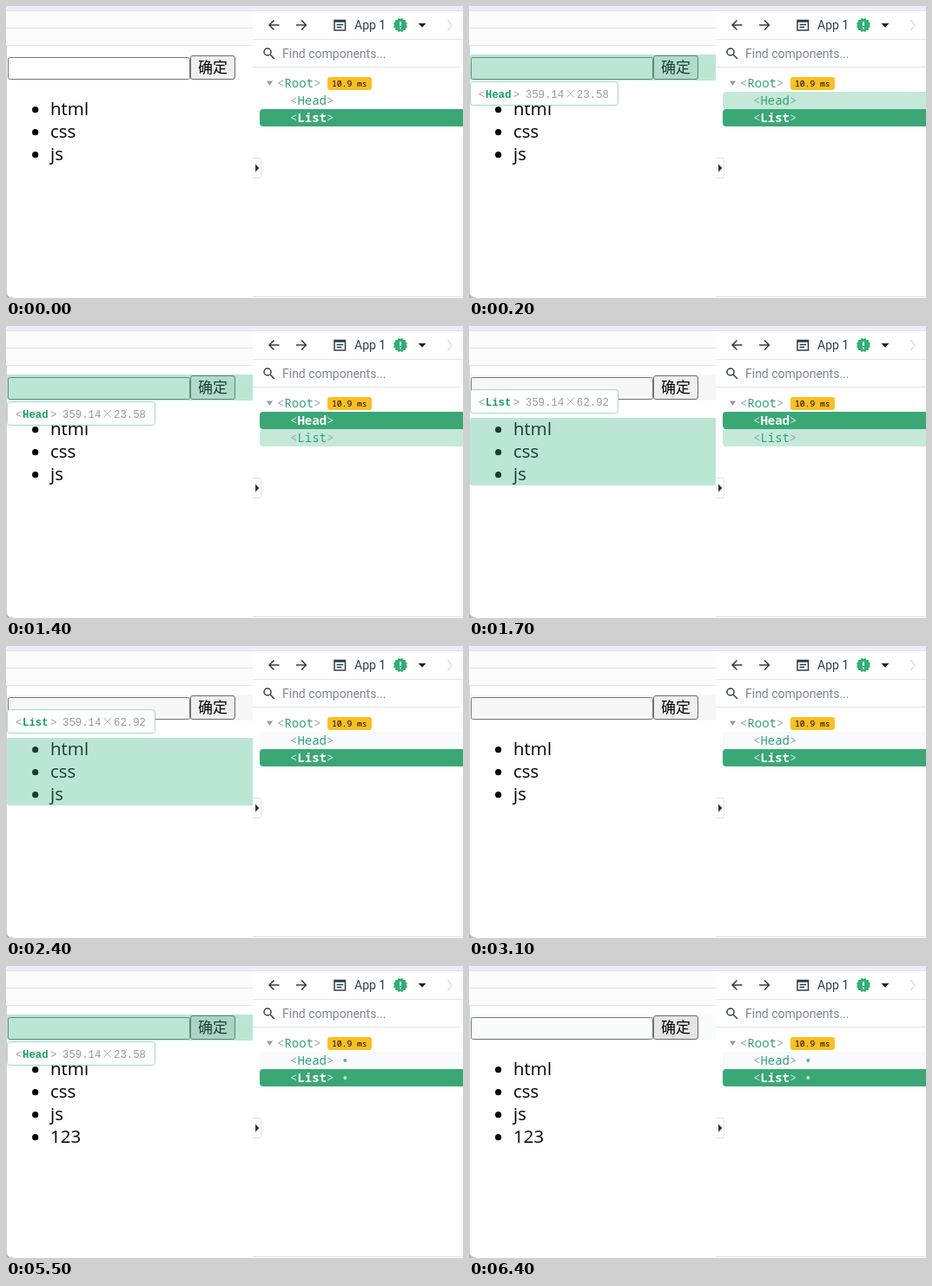
Recreate the animation shown at these times as an HTML page. Size 526 by 337 pixels, loop 6800 ms.

```html
<!DOCTYPE html>
<html lang="en">
<head>
<meta charset="utf-8">
<title>Component inspector</title>
<style>
html, body { margin: 0; width: 100%; height: 100%; overflow: hidden; background: #fff; }
svg { display: block; }
text { white-space: pre; }
.ui { font: 14px Roboto, sans-serif; }
.item { font: 20.5px "Open Sans", "Noto Sans", sans-serif; }
.field { font: 16px "Liberation Sans", sans-serif; }
.cjk { font: 17px "Noto Sans CJK SC", "Noto Sans CJK", sans-serif; }
.tag { font: 14px "Roboto Mono", "Noto Sans Mono", monospace; fill: #9aa3ad; }
.tag tspan { fill: #30a571; }
.sel { fill: #c9e9da; }
.sel tspan { fill: #fff; font-weight: 600; }
.tip { font: 12.3px "Liberation Mono", monospace; fill: #999; }
.tip .name { fill: #12a05c; font-weight: bold; }
.line { fill: none; stroke: #e1e3e8; }
.icon { fill: none; stroke: #2c3e50; stroke-width: 1.5; }
</style>
</head>
<body>
<svg width="526" height="337" viewBox="0 0 526 337">
  <!-- page -->
  <rect width="526" height="5.5" fill="#ededf5"/>
  <rect y="6" width="284" height="39" fill="#fcfcfd"/>
  <path class="line" d="M0 5.5H526M0 25.5H284M0 45.5H284"/>
  <path d="M.5 46V329Q.5 336.5 8 336.5" fill="none" stroke="#cfcfd2"/>
  <path d="M0 330Q1 336 7 337H0Z" fill="#b5b5b8"/>
  <rect id="band" x="1" y="56" width="283" height="30"/>
  <rect id="input" x="2.5" y="59.5" width="209" height="25" rx="2"/>
  <text id="typed" class="field" x="6.5" y="77"></text>
  <rect id="caret" y="62" width="1.5" height="19"/>
  <rect id="button" x="212.5" y="57.5" width="51" height="27" rx="2.5" stroke="#6b6b6b"/>
  <text class="cjk" x="221" y="77">确定</text>
  <g id="items"></g>
  <g id="overlays"></g>

  <!-- inspector -->
  <rect x="284" y="6" width="242" height="331" fill="#fff"/>
  <path class="line" d="M284 38.5H526M284 70.5H526M284 335.5H526"/>
  <path class="line" d="M284 175.5H291Q293.5 175.5 293.5 178V196Q293.5 198.5 291 198.5H284"/>
  <path d="M287 182.5L291.5 187L287 191.5Z" fill="#333"/>
  <path class="icon" d="M314.5 22H303M308.5 16.5L303 22L308.5 27.5M334 22H345.500M340 16.5L345.500 22L340 27.500"/>
  <path class="icon" d="M378 16.500H390.500V28H378ZM378 18H390.500M380.500 21.500H388M380.500 24.500H386"/>
  <text class="ui" x="401" y="26.500" fill="#2c3e50">App 1</text>
  <g id="badge" fill="#31ae76"></g>
  <path d="M454 18V23M454 24.500V26.500" stroke="#fff" stroke-width="1.700"/>
  <path d="M474.500 20H483.500L479 24.800Z" fill="#222"/>
  <path d="M508.500 16L513 22L508.500 28" fill="none" stroke="#c3c8cf"/>
  <circle class="icon" cx="301" cy="53" r="4"/>
  <path class="icon" d="M304 56L309 61"/>
  <text class="ui" x="318" y="60" fill="#7b8794">Find components...</text>
  <path d="M300 86.500H307L303.500 92Z" fill="#9a9a9a"/>
  <text class="tag" x="312" y="94">&lt;<tspan>Root</tspan>&gt;</text>
  <rect x="370" y="82" width="51" height="15" rx="3" fill="#fcbf23"/>
  <text x="375" y="93" style="font:9.7px 'Roboto Mono','Noto Sans Mono',monospace">10.9 ms</text>
  <g id="rows"></g>
</svg>
<script>
const $ = id => document.getElementById(id);
const LOOP = 6800;

$("items").innerHTML = ["html", "css", "js", "123"].map((word, i) => `<g>
  <circle cx="33.700" cy="${119.7 + 26 * i}" r="3.600"/>
  <text class="item" x="51" y="${126 + 26 * i}">${word}</text></g>`).join("");

const overlay = (name, y, height, tipY, size) => `<g>
  <rect x="1" y="${y}" width="287" height="${height}" rx="3" fill="#41b883" fill-opacity=".35"/>
  <rect x="1.500" y="${tipY + .5}" width="170" height="27" rx="3" fill="#fff" stroke="#a0dbc1"/>
  <g class="tip" transform="translate(0 ${tipY + 18.500})">
    <text x="11">&lt;</text><text class="name" x="19" textLength-none="">${name}</text><text x="51">&gt;</text>
    <text x="65">${size[0]}</text><text x="124">${size[1]}</text>
    <path d="M112.500 -8.500L121 0M121 -8.500L112.500 0" stroke="#999" stroke-width=".8"/>
  </g></g>`.replace(' textLength-none=""', "");
$("overlays").innerHTML = overlay("Head", 56, 30, 87, ["359.14", "23.58"])
  + overlay("List", 106, 78, 73, ["359.14", "62.92"]);

$("rows").innerHTML = ["Head", "List"].map((name, i) => `<g>
  <rect x="292" y="${99 + 20 * i}" width="240" height="20" rx="4"/>
  <text x="327" y="${114 + 20 * i}">&lt;<tspan>${name}</tspan>&gt;</text>
  <circle cx="390.300" cy="${109 + 20 * i}" r="1.900"/></g>`).join("");

// Scalloped seal: three squares turned against each other
$("badge").innerHTML = [0, 30, 60].map(a =>
  `<rect x="448" y="16" width="12" height="12" rx="1" transform="rotate(${a} 454 22)"/>`).join("");

const set = (el, attrs) => { for (const k in attrs) el.setAttribute(k, attrs[k]); };
const show = (el, on) => set(el, { visibility: on ? "visible" : "hidden" });

function draw(t) {
  const within = (a, b) => t >= a && t < b;

  set($("band"), { fill: within(1500, 5500) ? "#f7f7f7" : t >= 5700 ? "#f8fdfb" : "#fff" });
  const focused = within(3300, 5000);
  set($("input"), {
    fill: focused ? "#fff" : "none",
    stroke: focused ? "#e59700" : "#767676",
    "stroke-width": focused ? 2 : 1
  });
  const count = within(4000, 5100) ? (t < 4100 ? 1 : t < 4400 ? 2 : 3) : 0;
  $("typed").textContent = "123".slice(0, count);
  set($("caret"), { x: 6.5 + 8.9 * count });
  show($("caret"), within(3300, 3700) || within(4000, 5000));
  set($("button"), { fill: within(5000, 5100) ? "#f5f5f5" : t >= 4900 ? "#e5e5e5" : "#efefef" });
  show($("items").lastElementChild, t >= 5100);

  const [headBox, listBox] = $("overlays").children;
  show(headBox, within(200, 1500) || within(5500, 5700));
  show(listBox, within(1700, 2600));

  const selected = within(400, 1800) ? 0 : 1;
  const hovered = [
    within(100, 400) || within(2300, 2400) || within(5400, 5500),
    within(1400, 1800)
  ];
  const rest = [t >= 2400 ? "#f8fafc" : "#fff", "#fff"];
  [...$("rows").children].forEach((row, i) => {
    const [back, label, dot] = row.children;
    const on = i === selected;
    set(back, { fill: on ? "#3ba776" : hovered[i] ? "#c4e9d9" : rest[i] });
    set(label, { class: on ? "tag sel" : "tag" });
    set(dot, { fill: on ? "#c5ead9" : "#4bb98a" });
    show(dot, t >= [4000, 5100][i]);
  });
}

const start = performance.now();
function tick() {
  draw((performance.now() - start) % LOOP);
  requestAnimationFrame(tick);
}
tick();
</script>
</body>
</html>
```
